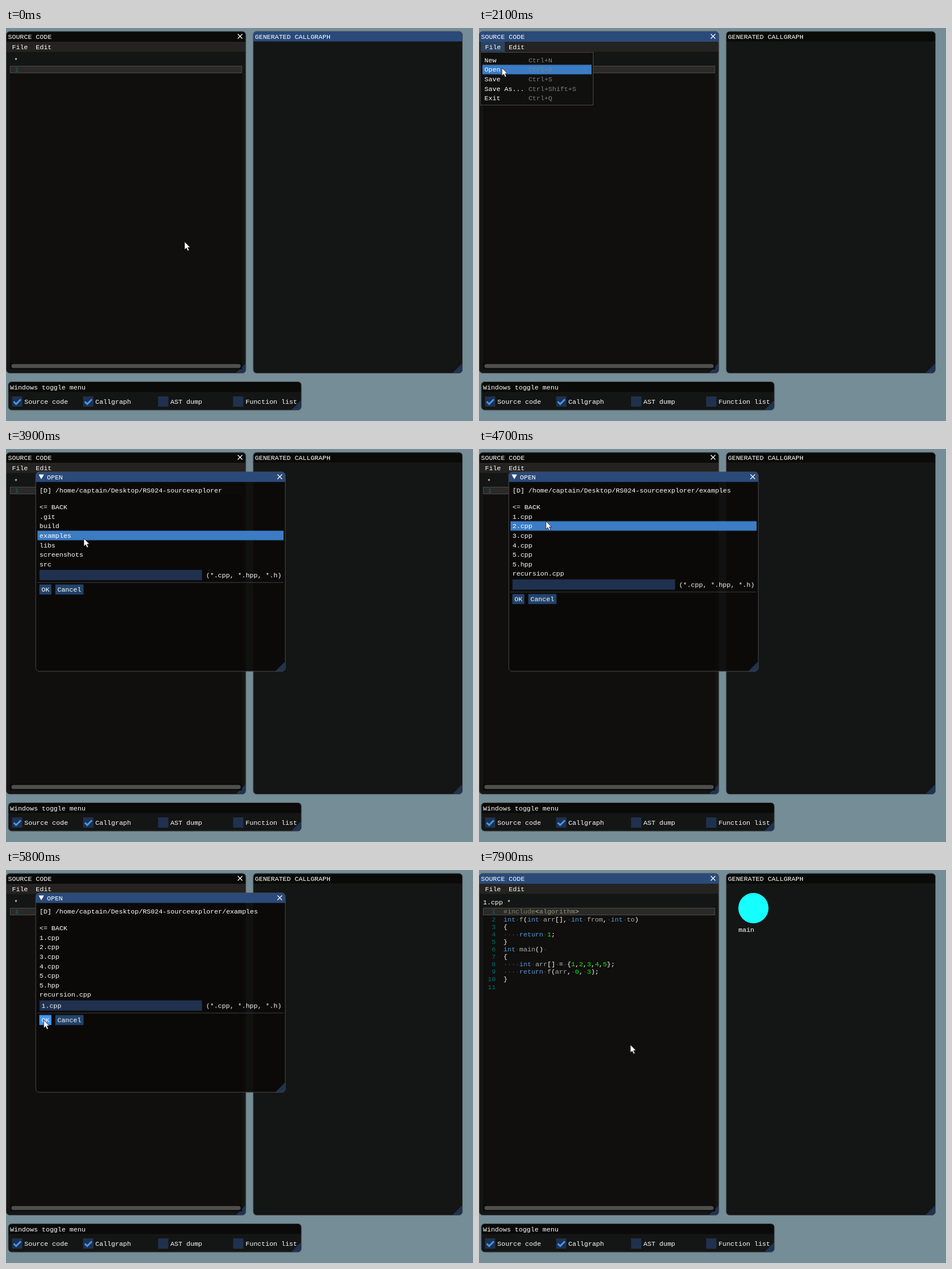
Recreate the animation shown at these times as an HTML page. Size 816 px wide and 686 px high, loop 8 s.

```html
<!DOCTYPE html>
<html lang="en">
<head>
<meta charset="utf-8">
<title>Source explorer</title>
<style>
html, body { margin: 0; width: 100%; height: 100%; overflow: hidden; background: #748d96; }
svg { display: block; width: 816px; height: 686px; }
text { font: 11.57px "Liberation Mono", monospace; fill: #fff; white-space: pre; }

.win { fill: #141615; }
.edge { fill: none; stroke: #484b4f; }
.title { fill: #0a0a08; }
.blue { fill: #2a4a7a; }
.grip { fill: #1f3350; }
.box { fill: #1f314e; }
.hover { fill: #3c7cc4; }
.button { fill: #22436a; }
.cross { stroke: #fff; stroke-width: 1.2; }
.tick { fill: none; stroke: #4296fa; stroke-width: 3; }
.dim { fill: #808080; }

.num { fill: #007070; }
.kw { fill: #569cd6; }
.lit { fill: #00ff00; }
.id { fill: #aaa; }
.dot { fill: #4c4c4a; }
.pre { fill: #80805f; }
.preid { fill: #959575; }
.prep { fill: #c0c0a0; }

/* One loop is 8 s, so 1.25% is 100 ms. */
.a { animation: 8s step-end infinite; }

.graph-title { animation-name: graph-title; }
@keyframes graph-title { 0% { fill: #2a4a7a } 16.25%, 100% { fill: #0a0a08 } }
.source-title { animation-name: source-title; }
@keyframes source-title {
  0%, 31.25% { fill: #0a0a08 }
  16.25%, 75%, 100% { fill: #2a4a7a }
}
.file { animation-name: file; }
@keyframes file {
  0% { fill: #242321 }
  16.25% { fill: #3c7cc4 }
  22.5% { fill: #2b4360 }
  31.25%, 100% { fill: #242321 }
}
.menu { animation-name: menu; }
@keyframes menu { 0% { opacity: 0 } 17.5% { opacity: 1 } 31.25%, 100% { opacity: 0 } }
.item { animation-name: item; }
@keyframes item {
  0% { opacity: 0; transform: none }
  23.75% { opacity: 1; transform: none }
  26.25%, 100% { opacity: 1; transform: translateY(16.6px) }
}
.dialog { animation-name: dialog; }
@keyframes dialog { 0% { opacity: 0 } 31.25% { opacity: 1 } 75%, 100% { opacity: 0 } }
.before { animation-name: before; }
@keyframes before { 0% { opacity: 1 } 53.75%, 100% { opacity: 0 } }
.after { animation-name: after; }
@keyframes after { 0% { opacity: 0 } 53.75%, 100% { opacity: 1 } }
.foot { animation-name: foot; }
@keyframes foot { 0% { transform: none } 53.75%, 100% { transform: translateY(16.6px) } }
.chosen { animation-name: chosen; }
@keyframes chosen { 0% { opacity: 0 } 62.5%, 100% { opacity: 1 } }
.ok { animation-name: ok; }
@keyframes ok {
  0% { fill: #22436a }
  72.5% { fill: #4296fa }
  73.75%, 100% { fill: #0f87fa }
}
.row { animation-name: row; }
@keyframes row {
  0% { opacity: 0; transform: none }
  41.25% { opacity: 1; transform: none }
  42.5%, 60% { opacity: 1; transform: translateY(16.6px) }
  45%, 56.25%, 63.75% { opacity: 1; transform: translateY(33.2px) }
  46.25%, 48.75%, 66.25% { opacity: 1; transform: translateY(49.8px) }
  47.5%, 67.5% { opacity: 1; transform: translateY(66.4px) }
  68.75% { opacity: 1; transform: translateY(99.6px) }
  70% { opacity: 1; transform: translateY(116.2px) }
  71.25%, 100% { opacity: 0; transform: none }
}
.press { animation-name: press; }
@keyframes press { 0% { fill: #3c7cc4 } 52.5% { fill: #3f8eec } 53.75%, 100% { fill: #3c7cc4 } }
.empty { animation-name: empty; }
@keyframes empty { 0% { opacity: 1 } 75%, 100% { opacity: 0 } }
.loaded { animation-name: loaded; }
@keyframes loaded { 0% { opacity: 0 } 75%, 100% { opacity: 1 } }
.node { animation-name: node; }
@keyframes node { 0% { opacity: 0 } 97.5%, 100% { opacity: 1 } }

.cursor { animation-name: cursor; fill: #fff; stroke: #111; stroke-width: .8; }
@keyframes cursor {
  0%, 3.75% { transform: translate(312px, 373px); animation-timing-function: steps(3, start) }
  7.5%, 8.75% { transform: translate(159px, 190px); animation-timing-function: steps(4, start) }
  13.75%, 22.5% { transform: translate(27px, 36px); animation-timing-function: steps(4, start) }
  27.5%, 40% { transform: translate(40px, 69.5px); animation-timing-function: steps(3, start) }
  43.75% { transform: translate(146px, 109px); animation-timing-function: steps(4, start) }
  48.75% { transform: translate(140px, 162px); animation-timing-function: steps(2, start) }
  51.25%, 56.25% { transform: translate(132px, 150px); animation-timing-function: steps(3, start) }
  60% { transform: translate(117px, 126px); animation-timing-function: steps(2, start) }
  62.5%, 63.75% { transform: translate(108px, 116px); animation-timing-function: steps(3, start) }
  67.5% { transform: translate(98.5px, 150.5px); animation-timing-function: steps(5, start) }
  73.75%, 77.5% { transform: translate(66px, 262px); animation-timing-function: steps(3, start) }
  81.25%, 88.75% { transform: translate(255.5px, 344.5px); animation-timing-function: steps(3, start) }
  92.5%, 95% { transform: translate(266px, 329px); animation-timing-function: steps(4, start) }
  100% { transform: translate(264.5px, 305px) }
}
</style>
</head>
<body>
<svg viewBox="0 0 816 686">
  <defs>
    <path id="grip" class="grip" d="M0-17V-6a6 6 0 0 1-6 6H-17Z"/>
    <path id="cross" class="cross" d="M-4-4 4 4M4-4-4 4"/>
    <rect id="box" class="box" width="18" height="18"/>
    <path id="tick" class="tick" d="M3 9.2 7.2 13.4 15.4 5.2"/>
  </defs>

  <!-- Source code window -->
  <rect class="win" x=".5" y="6" width="418.5" height="596.5" rx="6"/>
  <path class="title source-title a" d="M.5 24V12a6 6 0 0 1 6-6H413a6 6 0 0 1 6 6V24Z"/>
  <rect x="1" y="24" width="418" height="17.5" fill="#242321"/>
  <rect class="file a" x="3" y="24" width="42" height="17.5"/>
  <use href="#grip" x="418.5" y="602.5"/>
  <rect class="edge" x=".5" y="6" width="418.5" height="596.5" rx="6"/>
  <text x="3.5" y="18.8">SOURCE CODE</text>
  <use href="#cross" x="409" y="14.5"/>
  <text x="10.5" y="37.3">File</text>
  <text x="52" y="37.3">Edit</text>
  <rect x="7" y="66" width="405.5" height="518" fill="#100f0d"/>
  <rect x="7" y="584" width="405.5" height="12" fill="#0b0b0a"/>
  <rect x="9.5" y="586.5" width="400.5" height="7" rx="3.5" fill="#4f4f4e"/>
  <rect x="7.5" y="66.5" width="404.5" height="12" fill="#2b2a29" stroke="#4a4a49"/>
  <g class="empty a">
    <text x="14" y="59.7">*</text>
    <text class="num" x="15.5" y="76.4">1</text>
  </g>
  <g class="loaded a">
    <text x="7" y="59.7">1.cpp *</text>
    <g id="code"></g>
  </g>

  <!-- Callgraph window -->
  <rect class="win" x="432" y="6" width="365.5" height="596.5" rx="6"/>
  <path class="title graph-title a" d="M432 23.5V12a6 6 0 0 1 6-6H791.5a6 6 0 0 1 6 6V23.5Z"/>
  <use href="#grip" x="797" y="602.5"/>
  <rect class="edge" x="432" y="6" width="365.5" height="596.5" rx="6"/>
  <text x="435" y="18.8">GENERATED CALLGRAPH</text>
  <g class="node a">
    <circle cx="479.5" cy="66.5" r="26.4" fill="#15ffff"/>
    <text x="453.3" y="107.7">main</text>
  </g>

  <!-- Toggle window -->
  <rect class="win" x="4" y="617.5" width="512" height="49.5" rx="6"/>
  <path class="title" d="M4 635.5V623.5a6 6 0 0 1 6-6H510a6 6 0 0 1 6 6V635.5Z"/>
  <use href="#grip" x="515.5" y="667"/>
  <rect class="edge" x="4" y="617.5" width="512" height="49.5" rx="6"/>
  <text x="7" y="630.8">Windows toggle menu</text>
  <use href="#box" x="10.5" y="643"/>
  <use href="#tick" x="10.5" y="643"/>
  <text x="32" y="655.9">Source code</text>
  <use href="#box" x="134.7" y="643"/>
  <use href="#tick" x="134.7" y="643"/>
  <text x="156" y="655.9">Callgraph</text>
  <use href="#box" x="265.7" y="643"/>
  <text x="287.3" y="655.9">AST dump</text>
  <use href="#box" x="396.8" y="643"/>
  <text x="418.5" y="655.9">Function list</text>

  <!-- File menu -->
  <g class="menu a">
    <rect x="2.5" y="42.5" width="197" height="92" fill="#10100f" stroke="#47484c"/>
    <rect class="hover item a" x="6" y="47.6" width="190.7" height="16.6"/>
    <g data-x="9.6" data-y="59.8">New|Open|Save|Save As...|Exit</g>
    <g class="dim" data-x="86.4" data-y="59.8">Ctrl+N|Ctrl+O|Ctrl+S|Ctrl+Shift+S|Ctrl+Q</g>
  </g>

  <!-- Open dialog -->
  <g class="dialog a">
    <rect x="52" y="40" width="436" height="348" rx="6" fill="#0b0a09" fill-opacity=".94"/>
    <path class="blue" d="M52 57.5V46a6 6 0 0 1 6-6H482a6 6 0 0 1 6 6V57.5Z"/>
    <use href="#grip" x="487.5" y="388"/>
    <rect class="edge" x="52" y="40" width="436" height="348" rx="6"/>
    <path d="M57 44.5H66.4L61.7 52.7Z" fill="#fff"/>
    <text x="71.5" y="52.7">OPEN</text>
    <use href="#cross" x="478.3" y="48.5"/>
    <g class="row a"><rect class="hover press a" x="55" y="92.8" width="430" height="16.6"/></g>
    <text x="58.5" y="75.8">[D] /home/captain/Desktop/RS024-sourceexplorer<tspan class="after a">/examples</tspan></text>
    <text x="58.5" y="105.2">&lt;= BACK</text>
    <g class="before a" data-x="58.5" data-y="121.8">.git|build|examples|libs|screenshots|src</g>
    <g class="after a" data-x="58.5" data-y="121.8">1.cpp|2.cpp|3.cpp|4.cpp|5.cpp|5.hpp|recursion.cpp</g>
    <g class="foot a">
      <rect class="box" x="58.5" y="211" width="284" height="18"/>
      <text class="chosen a" x="62" y="224.2">1.cpp</text>
      <text x="349.5" y="224.2">(*.cpp, *.hpp, *.h)</text>
      <path d="M55 233H485" stroke="#434349"/>
      <rect class="button ok a" x="58.3" y="236.5" width="21" height="17.5"/>
      <rect class="button" x="86.2" y="236.5" width="49.2" height="17.5"/>
      <text x="62" y="249.2">OK</text>
      <text x="89.7" y="249.2">Cancel</text>
    </g>
  </g>

  <path class="cursor a" d="M0 0V14L3.2 11 5.6 16.2 8 15.1 5.7 10.1H9.8Z"/>
</svg>
<script>
function addText(parent, x, y, content, className) {
  const text = document.createElementNS("http://www.w3.org/2000/svg", "text");
  text.setAttribute("x", x);
  text.setAttribute("y", y);
  text.setAttribute("class", className || "");
  text.textContent = content;
  parent.append(text);
  return text;
}

// Lists of rows
for (const list of document.querySelectorAll("[data-x]")) {
  const rows = list.textContent.split("|");
  const { x, y } = list.dataset;
  list.textContent = "";
  rows.forEach((row, i) => addText(list, x, +y + i * 16.6, row, list.classList.contains("dim") ? "dim" : ""));
}

// Code with syntax colours and visible spaces
function tokenClass(token, inDirective) {
  if (inDirective) return token[0] === "#" ? "pre" : /\w/.test(token) ? "preid" : "prep";
  if (token === "·") return "dot";
  if (/^(int|return)$/.test(token)) return "kw";
  if (/^\d/.test(token)) return "lit";
  return /^\w/.test(token) ? "id" : "";
}

const code = document.getElementById("code");
const lines = `#include<algorithm>
int f(int arr[], int from, int to)
{
    return 1;
}
int main()\x20
{
    int arr[] = {1,2,3,4,5};
    return f(arr, 0, 3);
}
`.split("\n");

lines.forEach((line, i) => {
  const y = 76.4 + i * 13.12;
  addText(code, 15.3, y, String(i + 1).padStart(2, "\u00a0"), "num");
  const text = addText(code, 42.8, y, "");
  for (const token of line.replace(/ /g, "·").match(/#?\w+|./g) || []) {
    const span = document.createElementNS("http://www.w3.org/2000/svg", "tspan");
    span.setAttribute("class", tokenClass(token, line[0] === "#"));
    span.textContent = token;
    text.append(span);
  }
});
</script>
</body>
</html>
```
